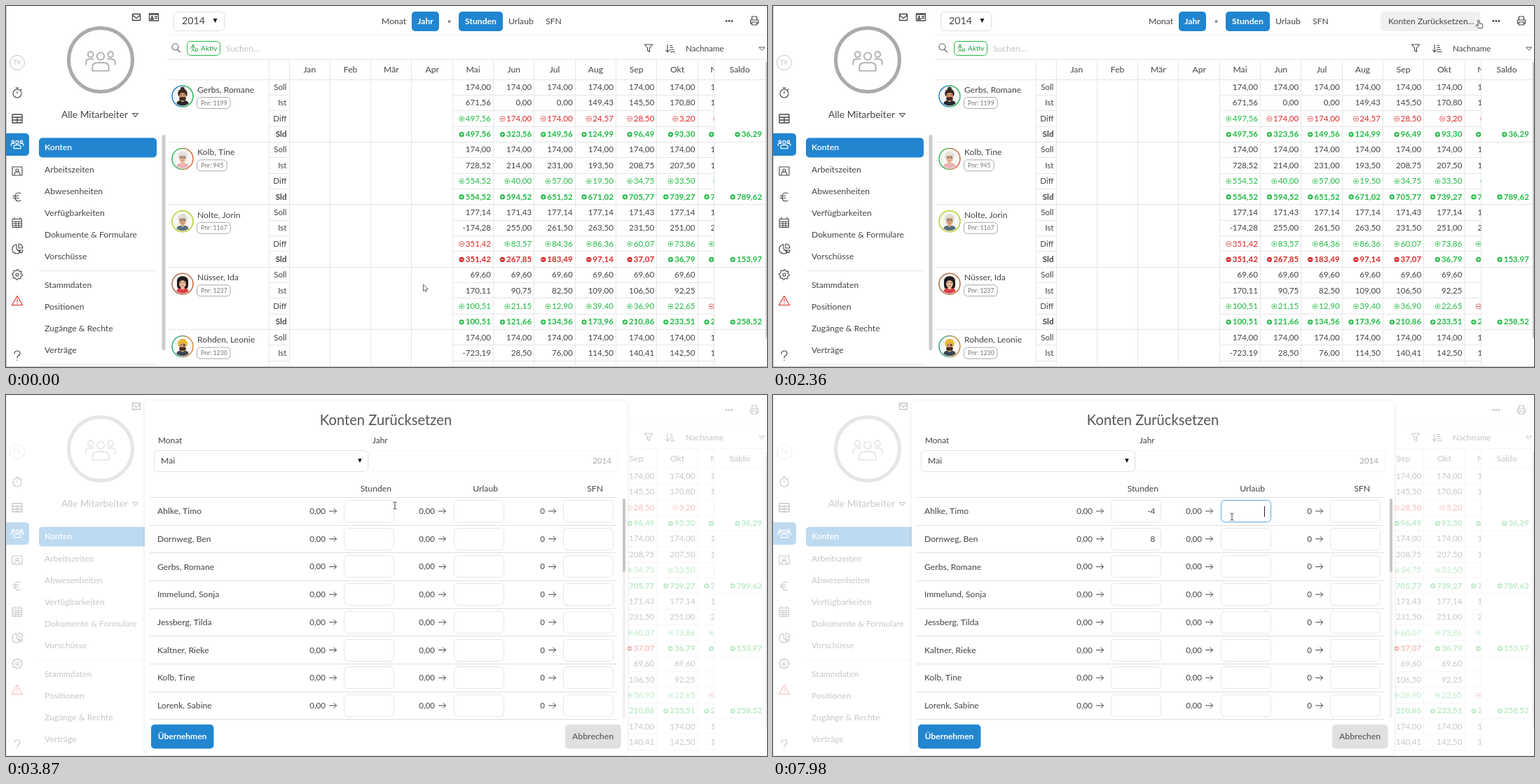
Recreate the animation shown at these times as an HTML page with a canvas. Size 1086 px wide and 516 px high, loop 8000 ms.

```html
<!DOCTYPE html>
<html lang="de">
<head>
<meta charset="utf-8">
<title>Konten</title>
<style>
html, body { margin: 0; width: 100%; height: 100%; overflow: hidden; background: #fff; }
canvas { display: block; }
</style>
</head>
<body>
<canvas id="stage" width="1086" height="516"></canvas>
<script>
const W = 1086, H = 516, LOOP = 8000;
const BLUE = '#2185d0', GREEN = '#21ba45', RED = '#db2828', INK = '#444', GRID = '#e6e6e6';
const stage = document.getElementById('stage').getContext('2d');
const layer = () => Object.assign(document.createElement('canvas'), { width: W, height: H }).getContext('2d');
const page = layer(), dialog = layer();
let c = page;

// drawing helpers
function text(s, x, y, size = 12.2, { color = INK, align = 'left', weight = 400 } = {}) {
  c.font = `${weight} ${size}px Lato, 'Open Sans', sans-serif`;
  c.textAlign = align;
  c.fillStyle = color;
  c.fillText(s, x, y + size * .35);
}
function box(x, y, w, h, { fill, stroke, r = 5, lw = 1 } = {}) {
  c.beginPath();
  c.roundRect(x, y, w, h, r);
  if (fill) { c.fillStyle = fill; c.fill(); }
  if (stroke) { c.strokeStyle = stroke; c.lineWidth = lw; c.stroke(); }
}
function line(x1, y1, x2, y2, color = GRID, lw = 1) {
  c.strokeStyle = color;
  c.lineWidth = lw;
  c.beginPath();
  c.moveTo(x1, y1);
  c.lineTo(x2, y2);
  c.stroke();
}
const hline = (x1, x2, y, color) => line(x1, Math.floor(y) + .5, x2, Math.floor(y) + .5, color);
const vline = (x, y1, y2, color) => line(Math.floor(x) + .5, y1, Math.floor(x) + .5, y2, color);
function disc(x, y, r, color, lw) {
  c.beginPath();
  c.arc(x, y, r, 0, 7);
  c.fillStyle = c.strokeStyle = color;
  if (lw) { c.lineWidth = lw; c.stroke(); } else c.fill();
}
function path(x, y, d, { stroke = INK, fill, lw = 1.1, scale = 1 } = {}) {
  const p = new Path2D(d);
  c.save();
  c.translate(x, y);
  c.scale(scale, scale);
  if (fill) { c.fillStyle = fill; c.fill(p); }
  if (stroke) {
    c.lineJoin = c.lineCap = 'round';
    c.strokeStyle = stroke;
    c.lineWidth = lw;
    c.stroke(p);
  }
  c.restore();
}
function clipTo(x, y, w, h) {
  c.save();
  c.beginPath();
  c.rect(x, y, w, h);
  c.clip();
}
const PEOPLE = 'M-4-4a4 4 0 1 0 8 0a4 4 0 1 0-8 0M-14-6a3 3 0 1 0 6 0a3 3 0 1 0-6 0M8-6a3 3 0 1 0 6 0a3 3 0 1 0-6 0' +
  'M-9 12v-4q0-5 6-5h6q6 0 6 5v4zM-16 5v-2q0-4 4-4h4M16 5v-2q0-4-4-4h-4';

function icons() {
  disc(16, 81, 10.5, '#c4c4c4', 1);
  text('TK', 16, 81, 9, { color: '#c4c4c4', align: 'center' });
  path(16, 125, 'M-6 0a6 6 0 1 0 12 0a6 6 0 1 0-12 0M-2-8h4M0-8v2M0-3v3M5-5l1-1');
  path(16, 161, 'M-7-6h14v12h-14zM-7-2h14M-7 2h14M0-2v8', { lw: 1.3 });
  box(-4, 182, 37, 32, { fill: BLUE });
  path(16, 197, PEOPLE, { stroke: '#fff', scale: .55, lw: 2.2 });
  path(16, 236, 'M-7-6h14v12h-14zM-2-1a2 2 0 1 0 4 0a2 2 0 1 0-4 0M-4 5q0-4 4-4t4 4');
  path(16, 273, 'M5-5q-2-1-3-1q-5 0-5 6t5 6q1 0 3-1M-6-1.5h8M-6 1.5h8');
  path(16, 310, 'M-6.5-5.5h13v12h-13zM-6.5-2h13M-6.5 1h13M-6.5 4h13M-2-2v8M2-2v8M-4-8v3M4-8v3', { lw: 1 });
  path(16, 347, 'M-1-6a6.5 6.5 0 1 0 5 11l-5-5zM2-7v6h6a6 6 0 0 0-6-6M2 2h6q0 3-2 4z');
  let gear = '';
  for (let i = 0; i < 32; i++) {
    const r = i % 4 < 2 ? 7.3 : 5.7, a = i * Math.PI / 16;
    gear += `${i ? 'L' : 'M'}${r * Math.cos(a)} ${r * Math.sin(a)}`;
  }
  path(16, 384, gear + 'zM-2 0a2 2 0 1 0 4 0a2 2 0 1 0-4 0');
  path(16, 421, 'M0-6.5l7.5 13h-15zM0-2v4M0 4v.4', { stroke: RED });
  path(16, 500, 'M-4-3q0-4 4-4t4 3.500q0 2-2.500 3.500q-1.500 1-1.500 3M0 6v.5', { lw: 1.2 });
  path(186, 16, 'M-5.5-4.5h11v9h-11zM-5.5-3l5.5 4.5l5.5-4.5', { lw: 1.3 });
  path(211, 16, 'M-6.5-5h13v10h-13zM-6.5-4h13M1.5-1h3M1.5 1.5h3M-4.5 3q0-2 2-2t2 2z', { lw: 1.3 });
  disc(208.5, 15, 1.3, INK);
  disc(135, 77, 45.5, '#ababab', 5);
  path(135, 77, PEOPLE, { stroke: '#b0b0b0', scale: 1.3, lw: 1.5 });
}

function sidebar() {
  icons();
  text('Alle Mitarbeiter', 79, 155.5, 13.8);
  path(184.5, 156, 'M-4-2.5h8l-4 5z');
  box(47, 188.5, 168, 28, { fill: BLUE });
  text('Konten', 55, 202, 12.2, { color: '#fff', weight: 600 });
  ['Arbeitszeiten', 'Abwesenheiten', 'Verfügbarkeiten', 'Dokumente & Formulare', 'Vorschüsse']
    .forEach((s, i) => text(s, 55, 233.5 + i * 31));
  ['Stammdaten', 'Positionen', 'Zugänge & Rechte', 'Verträge']
    .forEach((s, i) => text(s, 55, 398.5 + i * 31));
  hline(48, 215, 378);
  hline(48, 215, 512);
  box(222.5, 184, 5, 308, { fill: '#cbcbcb', r: 2.5 });
}

function toolbar() {
  box(239.5, 8.5, 72, 27, { stroke: '#dedede' });
  text('2014', 251, 21.5, 14.2);
  path(298.5, 21, 'M-3-3h6l-3 6z', { fill: '#111', stroke: null });
  box(579, 8, 39, 28, { fill: BLUE });
  box(646, 8, 63, 28, { fill: BLUE });
  text('Monat', 536, 21.5);
  text('Jahr', 598.5, 21.5, 12, { color: '#fff', weight: 700, align: 'center' });
  disc(632.5, 22, 2, '#888');
  text('Stunden', 677.5, 21.5, 12.2, { color: '#fff', weight: 700, align: 'center' });
  text('Urlaub', 717, 21.5);
  text('SFN', 770, 21.5);
  path(1068, 21, 'M-3.5-1v-5h6l1 1v4M-3.5 2h7v4h-7zM-3.5 4h-2v-5h11v5h-2', { lw: 1.2 });
  hline(232, W, 41, '#f1f1f1');
  path(242, 59.5, 'M-5-1a4.5 4.5 0 1 0 9 0a4.5 4.5 0 1 0-9 0M2.5 2.5l4 4', { stroke: '#666' });
  box(258.5, 50.5, 47, 20, { stroke: GREEN });
  path(268, 60, 'M-2-4a1 1 0 1 0 2 0a1 1 0 1 0-2 0M-1-2v4l-2 3M-1 2l2 3M-4 1l1-3h3l2 2M2 3a2 2 0 1 0 4 0a2 2 0 1 0-4 0', { stroke: '#219a3c', lw: .9 });
  text('Aktiv', 278, 60.5, 10.2, { color: '#219a3c' });
  text('Suchen...', 314, 60.5, 12.2, { color: '#c3c3c3' });
  path(917, 60.5, 'M-5.5-5.5h11l-4 5v5.5l-3-2v-3.5z');
  path(948, 60.5, 'M-4-5v10M-6.5 2.5l2.5 3l2.5-3M0-4h2.5M0-1h3.5M0 2h5M0 5h6.5');
  text('Nachname', 970, 60.5, 11.6);
  path(1079, 61, 'M-4-2h8l-4 4z', { lw: .9 });
}

// people: name, number, target hours, worked hours, total, ring colours, hair, skin, shirt
const STAFF = [
  ['Gerbs, Romane', 1199, [174], [671.56, 0, 0, 149.43, 145.504, 170.803, 165.8], '36,29', ['#2a7fd0', '#2fb757'], '#3a2a22', '#d39a72', '#26262b'],
  ['Kolb, Tine', 945, [174], [728.52, 214, 231, 193.5, 208.75, 207.5, 180], '789,62', ['#35b95a', '#d86a3a'], '#e4e1dc', '#eebd9e', '#eab3b8'],
  ['Nolte, Jorin', 1167, [177.14, 171.43, 177.14, 177.14, 171.43, 177.14, 171.43], [-174.28, 255, 261.497, 263.496, 231.5, 251, 205.5], '153,97', ['#b8cc2e', '#b5c81e'], '#dedcd6', '#dcaa82', '#55707c'],
  ['Nüsser, Ida', 1237, [69.6], [170.11, 90.75, 82.5, 109, 106.5, 92.25, 46.1], '258,52', ['#a5673f', '#c06a3c'], '#221b1b', '#edb997', '#d8404a'],
  ['Rohden, Leonie', 1230, [174], [-723.19, 28.5, 76, 114.5, 140.41, 142.5, 150], '', ['#2ba58b', '#d08a3a'], '#e6b92f', '#d99f72', '#3b4650']
];
const MONTHS = 'Jan Feb Mär Apr Mai Jun Jul Aug Sep Okt Nov'.split(' ');
const COL = 58.3, ROW = 22.35, TOP = 105, BOTTOM = 513;
const money = n => n.toFixed(2).replace('.', ',');

function avatar(y, i, [from, to], hair, skin, shirt) {
  const x = 252, ring = c.createLinearGradient(x - 15, 0, x + 15, 0);
  ring.addColorStop(.2, from);
  ring.addColorStop(.8, to);
  c.save();
  c.beginPath();
  c.arc(x, y, 13.5, 0, 7);
  c.fillStyle = '#f7f6f4';
  c.fill();
  c.clip();
  if (i == 3) box(x - 8, y - 11, 16, 20, { fill: hair, r: 7 });
  box(x - 9, y + 6, 18, 14, { fill: shirt, r: 6 });
  box(x - 2.5, y + 2, 5, 6, { fill: skin, r: 2 });
  disc(x, y - 4, 6.8, hair);
  if (!i) disc(x, y - 11, 2.8, hair);
  box(x - 4.8, y - 5, 9.6, 10, { fill: skin, r: 4.5 });
  if (i % 4 == 0) box(x - 4.8, y + 1, 9.6, 5, { fill: '#3d2a20', r: 2.5 });
  disc(x - 2.2, y - 2, .8, '#333');
  disc(x + 2.2, y - 2, i == 4 ? 1.4 : .8, '#333');
  if (i == 1 || i == 2) {
    disc(x - 2.3, y - 2, 1.9, '#777', .6);
    disc(x + 2.3, y - 2, 1.9, '#777', .6);
  }
  line(x - 1.3, y + 2.3, x + 1.3, y + 2.3, '#a34b42', .8);
  c.restore();
  disc(x, y, 15, ring, 1.5);
}

function amount(n, right, y, solid) {
  const color = n < 0 ? RED : GREEN, s = money(Math.abs(n));
  text(s, right, y, 11.6, { color, align: 'right', weight: solid ? 700 : 400 });
  const x = right - c.measureText(s).width - 5.5, sign = solid ? '#fff' : color;
  disc(x, y + .5, 3.6, color, solid ? 0 : .7);
  line(x - 2, y + .5, x + 2, y + .5, sign);
  if (n >= 0) line(x, y - 1.5, x, y + 2.5, sign);
}

function table() {
  hline(232, W, 76);
  clipTo(232, 76, W, BOTTOM - 76);
  hline(232, W, TOP);
  [375, 1010].forEach(x => vline(x, 76, H));
  for (let i = 0; i < 11; i++) vline(404 + i * COL, 76, H);
  text('Saldo', 1047, 90.5, 12.2, { align: 'center' });
  STAFF.forEach(([name, id, goal, worked, total, ring, hair, skin, shirt], g) => {
    const y0 = TOP + g * 4 * ROW, y = y0 + 11;
    if (g) hline(232, W, y0);
    avatar(y0 + 24, g, ring, hair, skin, shirt);
    text(name, 273, y0 + 14.5);
    text('Pnr: ' + id, 278, y0 + 33.5, 8.7, { color: '#777' });
    box(272.5, y0 + 25.5, c.measureText('Pnr: ' + id).width + 10, 16, { stroke: '#a8a8a8' });
    const rows = y + 2 * ROW < BOTTOM ? 4 : 2;
    ['Soll', 'Ist', 'Diff', 'Sld'].slice(0, rows).forEach((s, r) => {
      text(s, 400.5, y + r * ROW, 11.6, { align: 'right', weight: r == 3 ? 700 : 400 });
      [[375, 404], [637, 1010]].forEach(([a, b]) => hline(a, b, y0 + (r + 1) * ROW));
    });
    clipTo(232, 0, 778.5, H);
    let sum = 0;
    worked.forEach((n, i) => {
      const right = 692 + i * COL, target = goal[i] ?? goal[0];
      sum += n - target;
      text(money(target), right, y, 11.6, { align: 'right' });
      text(money(n), right, y + ROW, 11.6, { align: 'right' });
      if (rows < 4) return;
      amount(n - target, right, y + 2 * ROW);
      amount(sum, right, y + 3 * ROW, true);
    });
    if (!g) MONTHS.forEach((m, i) => text(m, 433.3 + i * COL, 90.5, 12.2, { align: 'center' }));
    c.restore();
    if (total) amount(+total.replace(',', '.'), 1079, y + 3 * ROW, true);
  });
  c.restore();
  box(1084, 80, 2, 395, { fill: '#c8c8c8', r: 1 });
}

function drawPage() {
  c = page;
  c.fillStyle = '#fff';
  c.fillRect(0, 0, W, H);
  vline(0, 0, H, '#c4c4c4');
  sidebar();
  toolbar();
  table();
  hline(0, W, 515, '#c4c4c4');
}

const ROSTER = ['Ahlke, Timo', 'Dornweg, Ben', 'Gerbs, Romane', 'Immelund, Sonja',
  'Jessberg, Tilda', 'Kaltner, Rieke', 'Kolb, Tine', 'Lorenk, Sabine'];

// value, focus and caret of the input fields at time t
function field(row, col, t) {
  if (row == 0 && col == 0) return {
    value: t < 4780 ? '' : t < 4990 ? '-' : '-4',
    focus: t >= 4230 && t < 6000, caret: t >= 4230 && t < 4780
  };
  if (row == 1 && col == 0) return {
    value: t < 6970 ? '' : '8',
    focus: t >= 6000 && t < 7980, caret: t >= 6070 && t < 6610 || t >= 6970 && t < 7500
  };
  const on = row == 0 && col == 1 && t >= 7980;
  return { value: '', focus: on, caret: on };
}

function drawDialog(t) {
  c = dialog;
  c.clearRect(0, 0, W, H);
  c.save();
  c.shadowColor = 'rgba(0,0,0,.1)';
  c.shadowBlur = 5;
  box(198, 8, 689, 507, { fill: '#fff', r: 8 });
  c.restore();
  text('Konten Zurücksetzen', 542, 36, 20.2, { color: '#555', align: 'center' });
  text('Monat', 217, 64.5, 11.9);
  text('Jahr', 523, 64.5, 11.9);
  box(211.5, 79.5, 305, 30, { stroke: '#e2e2e2' });
  box(517.5, 79.5, 356, 30, { stroke: '#f5f5f5' });
  text('Mai', 221, 94);
  path(505, 94, 'M-2.7-3h5.4l-2.7 6z', { fill: '#111', stroke: null });
  text('2014', 864, 93.5, 11.6, { color: '#a9a9a9', align: 'right' });
  [['Stunden', 550], ['Urlaub', 702], ['SFN', 852]].forEach(([s, x]) => text(s, x, 134, 12.2, { align: 'right' }));
  hline(205, 871, 146, '#dedede');
  ROSTER.forEach((name, row) => {
    const y = 166 + row * 39.7;
    text(name, 216, y);
    [[482, 456], [639, 612], [795, 769]].forEach(([x, right], col) => {
      const { value, focus, caret } = field(row, col, t);
      text(col < 2 ? '0,00' : '0', right, y, 11.6, { align: 'right' });
      path(right + 10.5, y, 'M-5 0h10M1.5-3.5l3.5 3.5l-3.5 3.5', { lw: 1 });
      box(x + .5, Math.round(y - 16) + .5, 71, 31, { stroke: focus ? '#5aa9e2' : '#e6e6e6' });
      text(value, x + 63.5, y, 11.9, { align: 'right' });
      if (caret) vline(x + 62, y - 7, y + 8, '#222');
    });
    hline(205, 871, y + 20, '#dedede');
  });
  box(880, 148, 4, 314, { fill: '#f0f0f0', r: 2 });
  box(880, 148, 4, 105, { fill: '#c6c6c6', r: 2 });
  box(207, 471, 89.5, 34.5, { fill: BLUE });
  box(798, 471, 79.5, 34.5, { fill: '#e0e0e0' });
  text('Übernehmen', 251.5, 488, 12, { color: '#fff', weight: 700, align: 'center' });
  text('Abbrechen', 837.5, 488, 12.3, { color: '#555', weight: 500, align: 'center' });
}

// pointer path: time, x, y
const TRACK = [[430, 595, 398], [1220, 964, 24], [1280, 964, 24], [1490, 1006, 16], [1710, 1039, 22], [1940, 1039, 22],
  [2680, 986, 20], [3200, 986, 20], [3690, 651, 143], [3740, 651, 143], [3870, 555, 158], [4070, 516, 158],
  [5480, 516, 158], [5820, 523, 221], [7480, 523, 221], [7770, 655, 174]];
const clamp = v => Math.max(0, Math.min(1, v));
const ramp = (t, a, b) => clamp((t - a) / (b - a));

function pointer(t) {
  const i = TRACK.findIndex(k => k[0] > t);
  if (i == 0) return TRACK[0].slice(1);
  if (i < 0) return TRACK.at(-1).slice(1);
  const [t0, x0, y0] = TRACK[i - 1], [t1, x1, y1] = TRACK[i];
  const u = ramp(t, t0, t1), e = u * u * (3 - 2 * u);
  return [x0 + (x1 - x0) * e, y0 + (y1 - y0) * e];
}

function drawPointer(t, x, y) {
  if (t > 3740) path(x, y, 'M-2-5q2 0 2 1q0-1 2-1M0-4v8M-2 5q2 0 2-1q0 1 2 1', { lw: 1 });
  else if (t > 1570 && t < 3270)
    path(x, y, 'M-1 0q1-1 2 0v4l4 1q1 0 1 2l-1 4h-5l-4-4q0-1 1-1l2 1z', { fill: '#fff', lw: 1 });
  else path(x, y, 'M.5.5v9l2-2l1.5 3l1.5-.7l-1.5-3h3z', { fill: '#fff', stroke: '#555', lw: .9 });
}

function drawMenu(t, x) {
  c.globalAlpha = x > 1016 ? ramp(t, 1560, 1690) : 0;
  box(1017, 8, 30, 28, { fill: '#f0f0f0' });
  c.globalAlpha = 1;
  [1028, 1032, 1036].forEach(d => disc(d, 21.5, 1.4, INK));
  const slide = ramp(t, 1940, 2200), shown = slide * (1 - ramp(t, 2990, 3080));
  if (!shown) return;
  c.globalAlpha = shown;
  const clicked = t >= 2930;
  if (x < 1010 && !clicked) box(867, 8, 143, 28, { fill: '#f0f0f0' });
  text('Konten Zurücksetzen...', 878 + 12 * (1 - slide), 21.5, 12.2, { color: clicked ? '#8c8c8c' : INK });
  c.globalAlpha = 1;
}

function frame(now) {
  const t = now % LOOP, [x, y] = pointer(t);
  const open = 1 - (1 - ramp(t, 2960, 3227)) ** 2;
  if (open) drawDialog(t);
  c = stage;
  c.drawImage(page.canvas, 0, 0);
  drawMenu(t, x);
  if (open) {
    c.fillStyle = `rgba(255,255,255,${.7 * open})`;
    c.fillRect(0, 0, W, H);
    const s = .8 + .2 * open;
    c.save();
    c.globalAlpha = open;
    c.translate(542.5 * (1 - s), 262 * (1 - s));
    c.scale(s, s);
    c.drawImage(dialog.canvas, 0, 0);
    c.restore();
  }
  drawPointer(t, x, y);
}

drawPage();
const start = performance.now();
requestAnimationFrame(function tick() {
  frame(performance.now() - start);
  requestAnimationFrame(tick);
});
</script>
</body>
</html>
```
